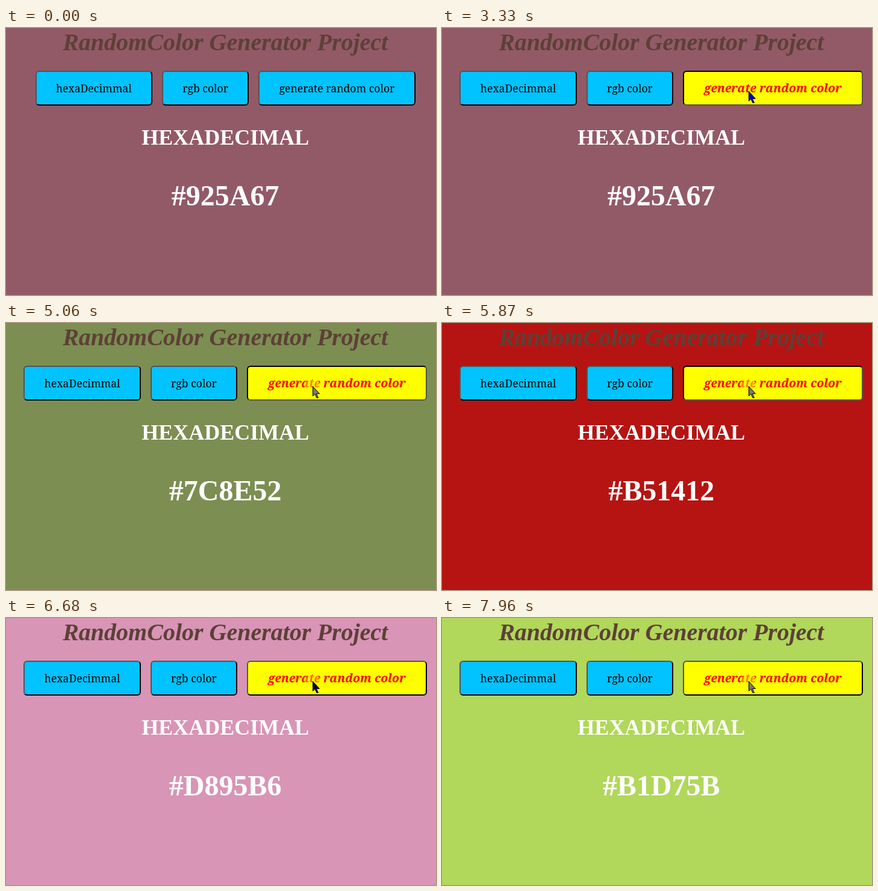
Recreate the animation shown at these times as an HTML page. Size 714 by 444 pixels, loop 8 s.

```html
<!DOCTYPE html>
<html lang="en">
<head>
<meta charset="utf-8">
<title>Random color generator</title>
<style>
  html, body { margin: 0; width: 100%; height: 100%; overflow: hidden; }
  #stage { position: relative; width: 714px; height: 444px; overflow: hidden; }
  h1, h2, #code, nav {
    position: absolute; left: 0; width: 728.4px; margin: 0;
    text-align: center; white-space: nowrap;
  }
  h1, h2, #code { color: #fff; font: bold 36px/60px "Liberation Serif", serif; }
  h1 { top: -6px; color: #5d4037; font-size: 40px; font-style: italic; }
  h2 { top: 152px; }
  #code { top: 249px; font-size: 48px; }
  nav { top: 71px; display: flex; justify-content: center; gap: 16px; }
  nav div {
    box-sizing: border-box; height: 58px; flex: none;
    border: 2px outset #000; border-radius: 6px; background: #00c3ff;
    color: #000; font: 17.6px/54px "Noto Serif", serif;
  }
  #generate.hover {
    background: #ff0; color: #f00;
    font-size: 19.4px; font-weight: bold; font-style: italic;
  }
  #generate.pressed { border-style: inset; }
  svg { position: absolute; left: 0; top: 0; }
</style>
</head>
<body>
<div id="stage">
  <h1>RandomColor Generator Project</h1>
  <nav>
    <div style="width:194.6px">hexaDecimmal</div>
    <div style="width:144px">rgb color</div>
    <div id="generate">generate random color</div>
  </nav>
  <h2>HEXADECIMAL</h2>
  <div id="code"></div>
  <svg width="714" height="444">
    <circle id="glow" cx="510" cy="106" r="13" fill="#ff0"/>
    <path id="cursor" d="M.5 .5V16.5L4 13L7 19.5H9.500L6.500 12.500H11.500Z" stroke="#000"/>
  </svg>
</div>
<script>
const LOOP = 8000, HOVER_AT = 1920;
const [stage, generate, code, cursor, glow] =
  ["stage", "generate", "code", "cursor", "glow"].map(id => document.getElementById(id));

// click glow: circle opacity and the pointer fill that goes with it
const OFF = [0, "#00d"], FADED = [.4, "#004"], FULL = [.5, "#777"];

// time, color, pressed, click glow
const states = [
  [0, "#925A67", false, OFF],
  [3180, "#925A67", true, FULL],
  [3230, "#925A67", true, FADED],
  [3330, "#925A67", true, OFF],
  [3380, "#5BC91D", false, FADED],
  [4350, "#5BC91D", true, FULL],
  [4500, "#7C8E52", false, FADED],
  [5060, "#7C8E52", true, FULL],
  [5210, "#B51412", false, FADED],
  [5870, "#B51412", true, FULL],
  [6070, "#A47F63", false, FADED],
  [6490, "#A47F63", true, FULL],
  [6680, "#D895B6", false, FADED],
  [7190, "#D895B6", true, FULL],
  [7340, "#8FA274", false, FADED],
  [7740, "#8FA274", true, FULL],
  [7910, "#B1D75B", false, FADED],
  [7960, "#B1D75B", false, FULL],
];

// time, x, y of the pointer tip
const path = [
  [1070, 632, 432], [1320, 560, 348], [1570, 511, 270],
  [1870, 508, 151], [1920, 508, 127], [2220, 509, 105],
];

function pointerAt(time) {
  const t = Math.min(Math.floor((time - 20) / 50) * 50 + 20, 2220);
  const i = Math.max(1, path.findIndex(p => p[0] >= t));
  const [t0, x0, y0] = path[i - 1], [t1, x1, y1] = path[i];
  const k = (t - t0) / (t1 - t0);
  return [x0 + (x1 - x0) * k, y0 + (y1 - y0) * k].map(Math.round);
}

function draw(now) {
  const t = now % LOOP;
  const [, color, pressed, [opacity, fill]] = states.findLast(s => s[0] <= t);
  const hover = t >= HOVER_AT;

  stage.style.background = color;
  code.textContent = color;
  generate.style.width = hover ? "299px" : "260.8px";
  generate.classList.toggle("hover", hover);
  generate.classList.toggle("pressed", pressed);

  cursor.style.display = t < 1100 ? "none" : "";
  cursor.setAttribute("transform", `translate(${pointerAt(t)})`);
  cursor.setAttribute("fill", hover ? fill : "#6da598");
  glow.setAttribute("opacity", opacity);
  requestAnimationFrame(draw);
}
requestAnimationFrame(draw);
</script>
</body>
</html>
```
